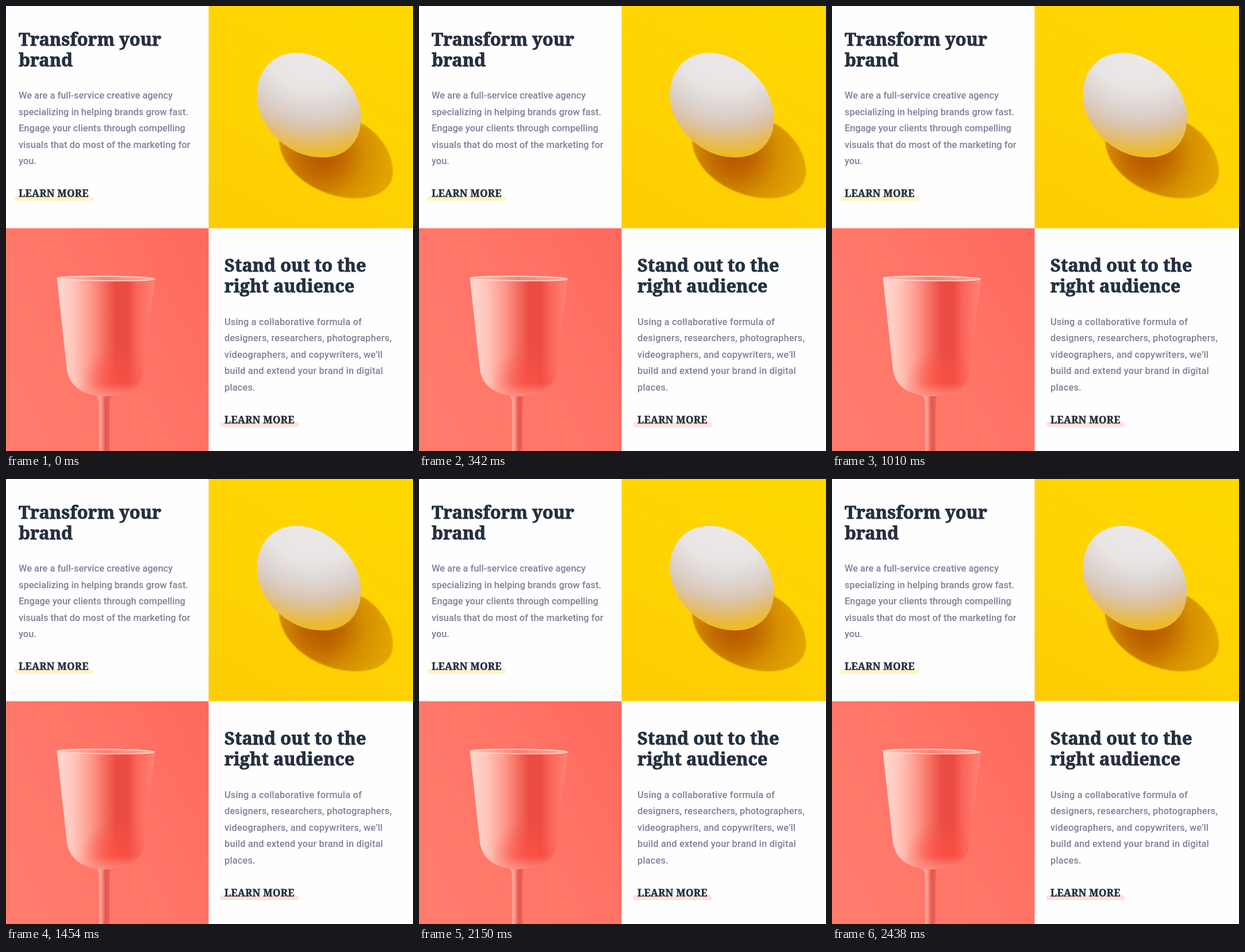
An HTML page for the animation above (2.63 s loop, 708 by 774 pixels).

```html
<!DOCTYPE html>
<html lang="en">
<head>
<meta charset="utf-8">
<title>Agency tiles</title>
<style>
  html, body { margin: 0; width: 100%; height: 100%; overflow: hidden; background: #fefefe; }
  svg { display: block; }
  .head, .link { fill: #24303f; stroke: #24303f; stroke-linejoin: round; }
  .head { font: 800 30.7px "Noto Serif", serif; stroke-width: .9px; }
  .body { font: 500 16.4px Roboto, sans-serif; fill: #7d8197; }
  .link { font: 800 17.2px "Noto Serif", serif; letter-spacing: .3px; stroke-width: .5px; }
</style>
</head>
<body>
<svg width="708" height="774" viewBox="0 0 708 774">
  <defs>
    <linearGradient id="yellow" x1=".8" y1="0" x2=".3" y2="1">
      <stop offset="0" stop-color="#ffd800"/>
      <stop offset=".6" stop-color="#ffd302"/>
      <stop offset="1" stop-color="#fdcd04"/>
    </linearGradient>
    <linearGradient id="coral" x1="0" y1=".6" x2="1" y2="0">
      <stop offset="0" stop-color="#ff7b6b"/>
      <stop offset=".5" stop-color="#ff7466"/>
      <stop offset="1" stop-color="#fe685d"/>
    </linearGradient>
    <radialGradient id="shell" gradientUnits="userSpaceOnUse" cx="535" cy="60" r="206">
      <stop offset="0" stop-color="#edebea"/>
      <stop offset=".42" stop-color="#e8e5e4"/>
      <stop offset=".6" stop-color="#ddd3ce"/>
      <stop offset=".72" stop-color="#dac6b2"/>
      <stop offset=".8" stop-color="#dfbf88"/>
      <stop offset=".9" stop-color="#e8bb4c"/>
      <stop offset="1" stop-color="#f3b810"/>
    </radialGradient>
    <radialGradient id="shade" gradientUnits="userSpaceOnUse" cx="550" cy="258" r="118">
      <stop offset="0" stop-color="#b65500"/>
      <stop offset=".3" stop-color="#c06800"/>
      <stop offset=".65" stop-color="#d69000"/>
      <stop offset="1" stop-color="#e2a300"/>
    </radialGradient>
    <linearGradient id="bowl">
      <stop offset="0" stop-color="#ffd9d1"/>
      <stop offset=".17" stop-color="#ffc5bb"/>
      <stop offset=".34" stop-color="#fe9b8e"/>
      <stop offset=".48" stop-color="#f76f63"/>
      <stop offset=".6" stop-color="#ea4d43"/>
      <stop offset=".72" stop-color="#eb4b42"/>
      <stop offset=".82" stop-color="#fb665a"/>
      <stop offset="1" stop-color="#ff8375"/>
    </linearGradient>
    <radialGradient id="glow" gradientUnits="userSpaceOnUse" cx="190" cy="655" r="62">
      <stop offset="0" stop-color="#ff5246" stop-opacity=".8"/>
      <stop offset="1" stop-color="#ff5246" stop-opacity="0"/>
    </radialGradient>
    <linearGradient id="base" gradientUnits="userSpaceOnUse" x1="0" y1="656" x2="0" y2="680">
      <stop offset="0" stop-color="#ffa094" stop-opacity="0"/>
      <stop offset="1" stop-color="#ffa094" stop-opacity=".75"/>
    </linearGradient>
    <linearGradient id="mouth">
      <stop offset="0" stop-color="#ffc4ba"/>
      <stop offset=".5" stop-color="#f58376"/>
      <stop offset="1" stop-color="#ffa89c"/>
    </linearGradient>
    <linearGradient id="stem">
      <stop offset="0" stop-color="#ffb9ae"/>
      <stop offset=".3" stop-color="#ff9b8f"/>
      <stop offset=".55" stop-color="#e4574c"/>
      <stop offset=".8" stop-color="#ee6056"/>
      <stop offset="1" stop-color="#ff9184"/>
    </linearGradient>
    <filter id="soft" x="-5%" y="-5%" width="110%" height="110%">
      <feGaussianBlur stdDeviation=".9"/>
    </filter>
  </defs>

  <rect width="708" height="774" fill="#fefefe"/>
  <rect x="352.5" width="355.5" height="386.5" fill="url(#yellow)"/>
  <rect y="386.5" width="352.5" height="387.5" fill="url(#coral)"/>

  <g id="egg">
    <path filter="url(#soft)" fill="url(#shade)" d="M600 195 L616 203 C648 218 673 255 673 288 C673 318 646 334.5 609 334.5 C545 334.5 478 290 475 234Z"/>
    <path fill="url(#shell)" d="M505 81.5 C560 81.5 617.5 138 617.5 195 C617.5 238 590 263.5 550 263.5 C488 263.5 436.5 208 436.5 155 C436.5 112 464 81.5 505 81.5Z"/>
  </g>

  <g id="glass">
    <path fill="url(#stem)" d="M157 676 Q162 681 162 696 V774 H180 V696 Q180 681 186 676Z"/>
    <path fill="url(#bowl)" d="M88.5 473 L105 624 C107 658 128 677 172 679 C212 677 236 666 239 636 L259 475Z"/>
    <path id="cup" fill="url(#glow)" d="M99 570 L105 624 C107 658 128 677 172 679 C212 677 236 666 239 636 L247 570Z"/>
    <use href="#cup" style="display:none"/>
    <path fill="url(#base)" d="M105 624 C107 658 128 677 172 679 C212 677 236 666 239 636 L240 624Z"/>
    <ellipse cx="173.7" cy="474" rx="84.5" ry="3.8" transform="rotate(.6 173.7 474)" fill="url(#mouth)" stroke="#ffd4cb" stroke-width="1.8"/>
  </g>

  <g id="copy"></g>
</svg>
<script>
const LOOP = 2630;
const SQUEEZE = 0.757;
const narrowSpans = [[570, 1010], [1750, 2150]];
const byId = id => document.getElementById(id);

function add(tag, attrs, text = "") {
  const el = document.createElementNS("http://www.w3.org/2000/svg", tag);
  for (const key in attrs) el.setAttribute(key, attrs[key]);
  el.textContent = text;
  byId("copy").append(el);
}

function block(x, y, tint, title, lines, gap) {
  title.forEach((s, i) => add("text", { class: "head", x, y: y + i * 36 }, s));
  lines.forEach((s, i) =>
    add("text", { class: "body", x, y: y + 92.5 + i * 28.5, "letter-spacing": gap }, s));
  add("rect", { x: x - 7.5, y: y + 262, width: 137, height: 8.5, rx: 4.2, fill: tint });
  add("text", { class: "link", x, y: y + 263.5 }, "LEARN MORE");
}

block(22, 68.5, "#fff3c5", ["Transform your", "brand"], [
  "We are a full-service creative agency",
  "specializing in helping brands grow fast.",
  "Engage your clients through compelling",
  "visuals that do most of the marketing for",
  "you."
], 0);
block(380, 462, "#ffe1db", ["Stand out to the", "right audience"], [
  "Using a collaborative formula of",
  "designers, researchers, photographers,",
  "videographers, and copywriters, we’ll",
  "build and extend your brand in digital",
  "places."
], 0.15);

function squash(id, cx, k) {
  byId(id).setAttribute("transform", `translate(${cx * (1 - k)} 0) scale(${k} 1)`);
}

function draw(ms) {
  const t = ms % LOOP;
  const narrow = narrowSpans.some(([a, b]) => t >= a && t < b);
  const k = narrow ? SQUEEZE : 1;
  squash("egg", 532, k);
  squash("glass", 173.5, k);
}

const start = performance.now();
function tick() {
  draw(performance.now() - start);
  requestAnimationFrame(tick);
}
tick();
</script>
</body>
</html>
```
